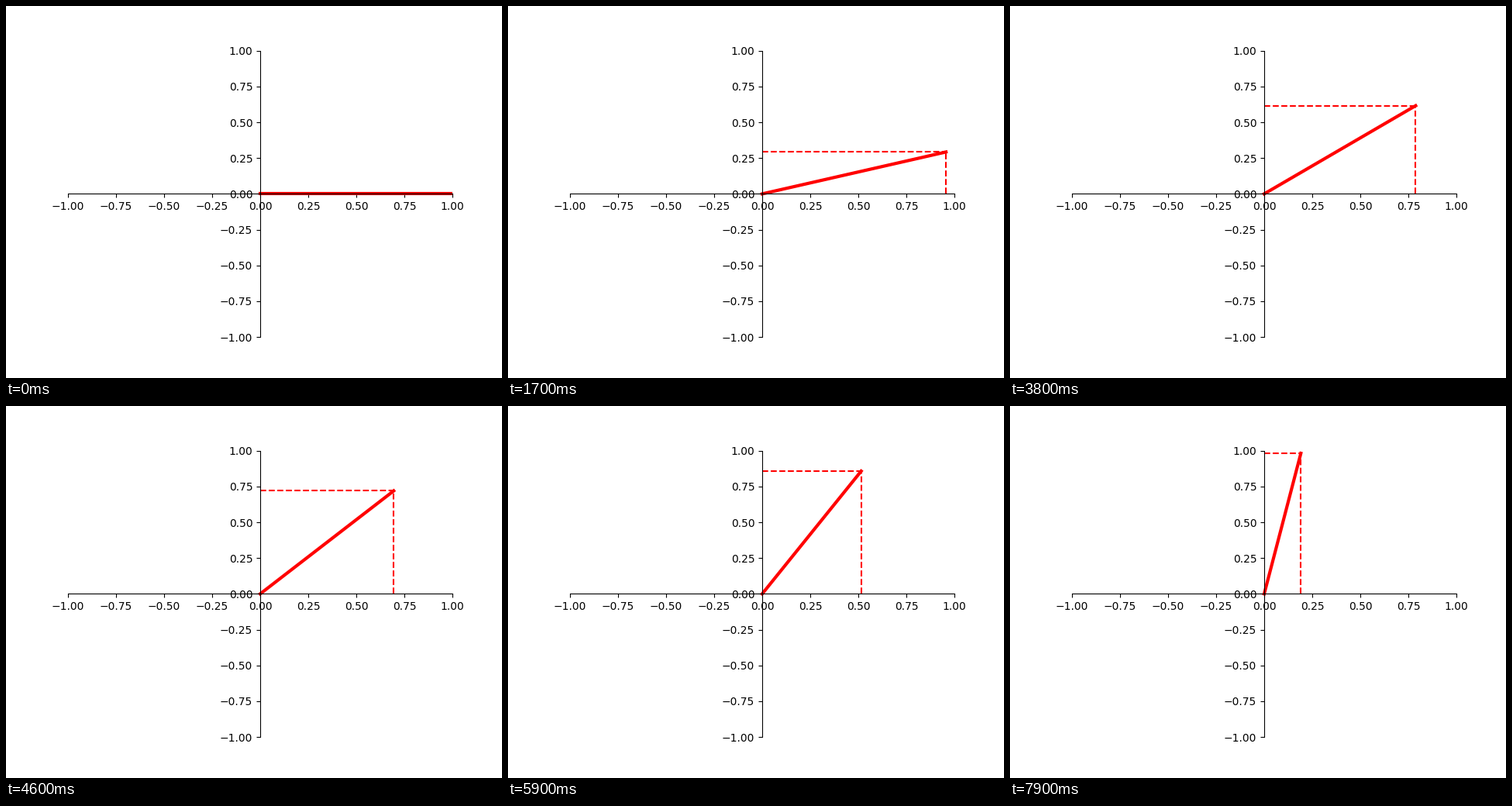
A matplotlib script for the animation above (8 s loop, 640 by 480 pixels).

```python
import matplotlib.pyplot as plt
import numpy as np
from matplotlib.animation import FuncAnimation

FRAMES = 80
INTERVAL = 100  # ms, the vector turns one degree per step

fig, ax = plt.subplots(figsize=(6.4, 4.8), dpi=100)
ax.set_xlim(-1, 1)
ax.set_ylim(-1, 1)
for side in ("right", "top"):
    ax.spines[side].set_color("none")
for side in ("left", "bottom"):
    ax.spines[side].set_position(("data", 0))

vector, = ax.plot([], [], color="red", lw=3)
drop, = ax.plot([], [], color="red", ls="--")
level, = ax.plot([], [], color="red", ls="--")


def update(i):
    angle = np.radians(i)
    x, y = np.cos(angle), np.sin(angle)
    vector.set_data([0, x], [0, y])
    drop.set_data([x, x], [0, y])
    level.set_data([0, x], [y, y])
    return vector, drop, level


anim = FuncAnimation(fig, update, frames=FRAMES, interval=INTERVAL,
                     repeat=True, repeat_delay=0, blit=False)
plt.show()
```
